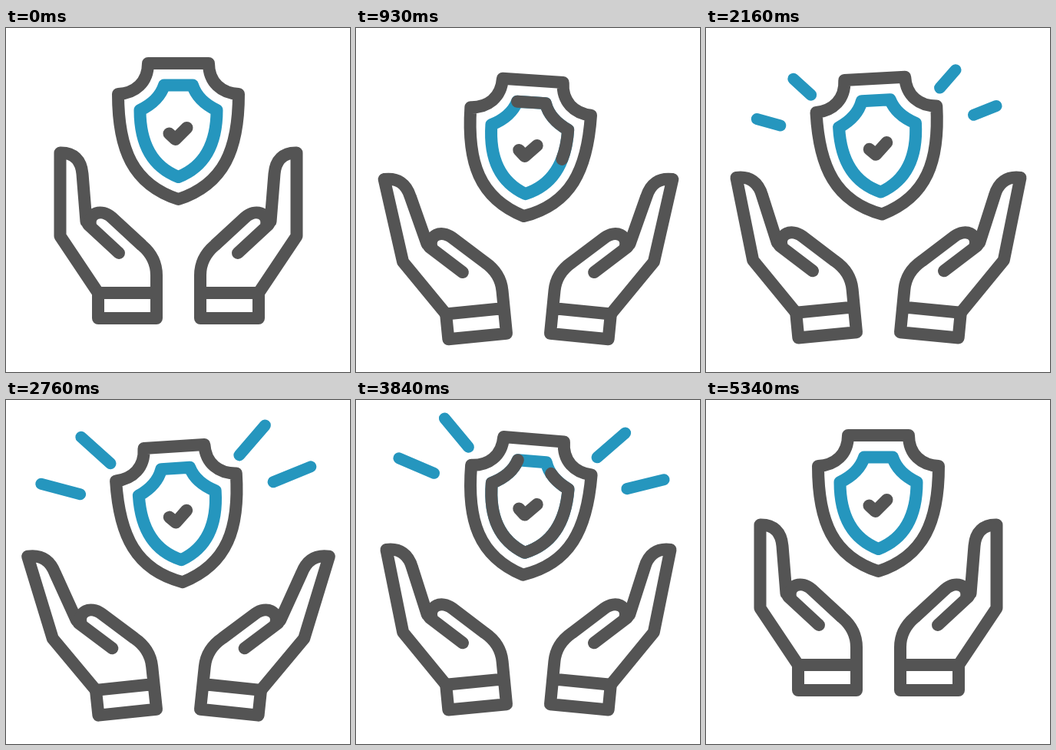
An HTML page for the animation above (5400 ms loop, 448 by 448 pixels).

```html
<!DOCTYPE html>
<html lang="en">
<head>
<meta charset="utf-8">
<title>Protected shield</title>
<style>
html, body { margin: 0; height: 100%; overflow: hidden; background: #fff; }
svg { display: block; width: 100vw; height: 100vh; }
path { fill: none; stroke: #545454; stroke-width: 16; stroke-linecap: round; stroke-linejoin: round; }
.blue { stroke: #2596be; }
#rays { stroke-width: 15; }
</style>
</head>
<body>
<svg viewBox="0 0 448 448">
  <g id="hand">
    <path id="finger"/>
    <path d="M147 293L107 256M110 257C107 241 124 234.5 138 247L177 283C190 294 196 306 196 322V378H120V345H196"/>
  </g>
  <use href="#hand" transform="matrix(-1 0 0 1 449 0)"/>
  <g id="shield">
    <path d="M185 46H264C264 71 281 85 303 86C303 158 284 203.5 224.5 223C165 203.5 146 158 146 86C168 85 185 71 185 46Z"/>
    <path class="blue" id="crest" d="M206 74.5H243C248 90 260 100 274.5 107C274.5 155 255 182 224.5 194C194 182 174.5 155 174.5 107C189 100 201 90 206 74.5Z"/>
    <path id="sweep" pathLength="1"/>
    <path d="M212.5 137.5L220.5 145L235.5 130"/>
    <path class="blue" id="rays"/>
  </g>
</svg>
<script>
const $ = id => document.getElementById(id);
const LOOP = 5400, STEP = 30;
const ease = p => (1 - Math.cos(Math.PI * Math.min(1, Math.max(0, p)))) / 2;

// Eased walk through evenly spaced key values
function tween(t, span, keys) {
  const last = keys.length - 1;
  const p = Math.min(last, Math.max(0, t / span));
  const i = Math.min(last - 1, Math.floor(p));
  return keys[i] + (keys[i + 1] - keys[i]) * ease(p - i);
}

function drawHands(t) {
  if (t > 4200) t = 4200 + (t - 4200) / 1.2; // slower way back to rest
  const drop = tween(t, 600, [0, 32, 11, 32, 11, 32, 11, 32, 0]);
  const tilt = tween(t, 600, [0, 6.5, 5, 6.5, 5, 6.5, 5, 6.5, 0]);
  const b = tween(t, 600, [0, 1, 0, 1, 0, 1, 0, 1, 0]);
  $('hand').setAttribute('transform', `translate(0 ${drop}) rotate(${-tilt} 196 378)`);
  $('finger').setAttribute('d',
    `M120 345L${70.5 + b} ${271 + 2 * b}L${70.5 - 31.6 * b} 162.5` +
    `C${88 - 31 * b} 162 ${98 - 30 * b} ${172 - 2 * b} ${99.5 - 25 * b} ${190 - 3 * b}L104.5 252`);
}

function drawShield(t) {
  const s = Math.min(4800, Math.max(0, t - 90));
  const drop = 17 * (1 - Math.cos(s / 600 * Math.PI));
  const swing = tween(s, 1200, [0, 4.8, -4.8, 4.8, 0]);
  $('shield').setAttribute('transform', `translate(0 ${drop}) rotate(${swing} 224.5 134)`);

  const k = (t - 686) % 2400;
  const from = ease((k - 600) / 600), to = ease(k / 600);
  const sweep = $('sweep');
  sweep.style.display = to > from ? '' : 'none';
  sweep.setAttribute('stroke-dasharray', `${to - from} 2`);
  sweep.setAttribute('stroke-dashoffset', -from);
}

function drawRays(t) {
  const from = ease((t - 5010) / 330);
  const to = tween(t - 990, 600, [0, 1, 0.6, 1, 0.6, 1, 0.6, 1]);
  let d = '';
  if (to > from) {
    for (const [x, y, dx, dy] of [[98.5, 100.4, -50, -16.8], [140.4, 62.8, -36, -36.8]]) {
      for (const at of [v => v, v => 449 - v]) {
        d += `M${at(x + dx * from)} ${y + dy * from}L${at(x + dx * to)} ${y + dy * to}`;
      }
    }
  }
  $('rays').setAttribute('d', d);
}

function frame() {
  const now = performance.now() % LOOP;
  const t = Math.min(LOOP - 2 * STEP, Math.floor(now / STEP) * STEP);
  drawHands(t);
  drawShield(t);
  drawRays(t);
  requestAnimationFrame(frame);
}

$('sweep').setAttribute('d', $('crest').getAttribute('d'));
frame();
</script>
</body>
</html>
```
